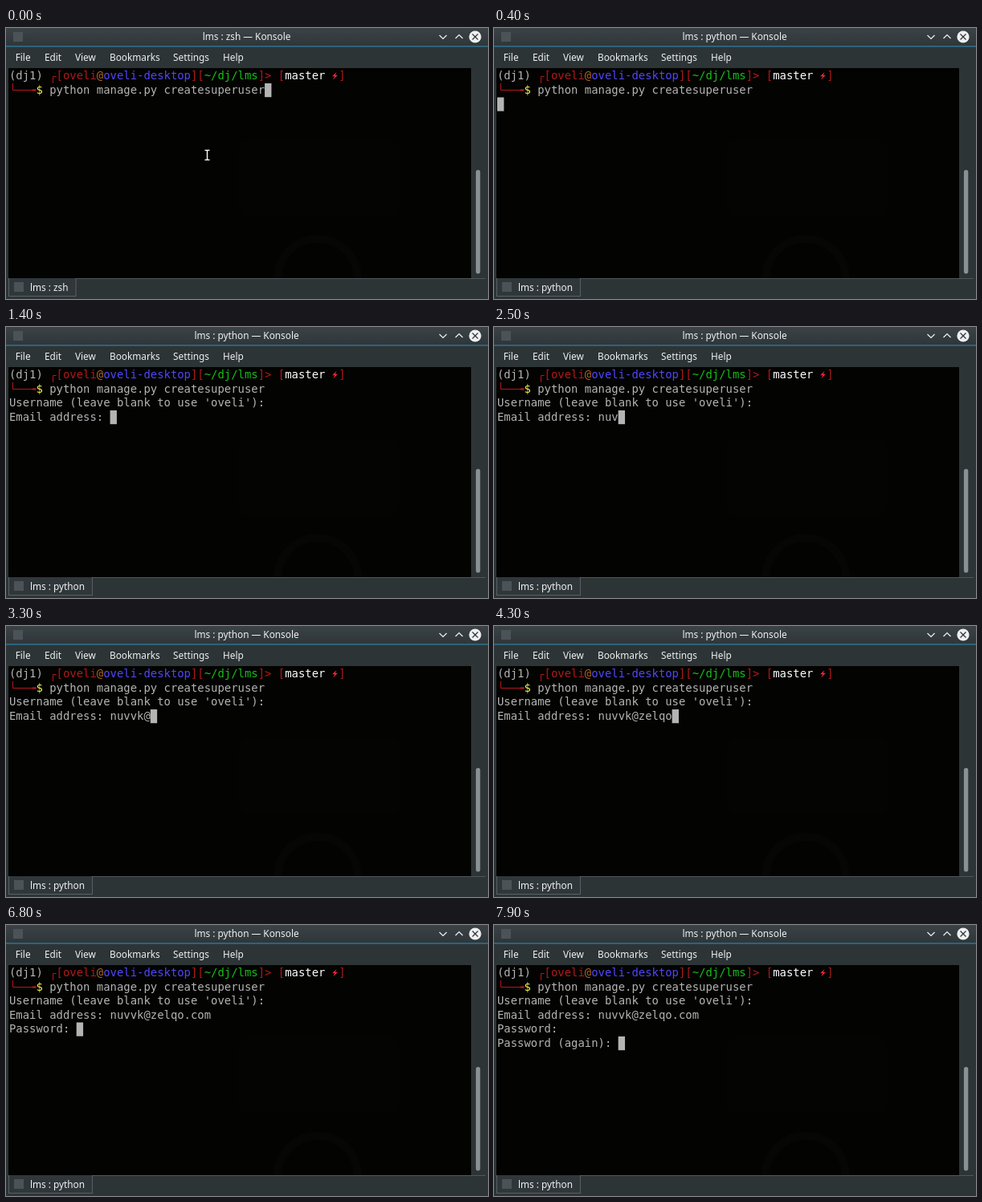
Recreate the animation shown at these times as an HTML page with a canvas. Size 600 px wide and 338 px high, loop 8000 ms.

```html
<!DOCTYPE html>
<html lang="en">
<head>
<meta charset="utf-8">
<title>Terminal</title>
<style>
html, body { margin: 0; width: 100%; height: 100%; overflow: hidden; background: #2d3436; }
canvas { display: block; width: 600px; height: 338px; }
</style>
</head>
<body>
<canvas id="stage"></canvas>
<script>
const W = 600, H = 338, LOOP = 8000;
const CELL_W = 8.37, CELL_H = 17.5, LEFT = 4, TOP = 51.5;
const MONO = '13.9px "DejaVu Sans Mono", monospace';
const UI = '11.8px "Noto Sans", sans-serif';
const RED = '#b01818', GREY = '#b4b4b4', LIGHT = '#eff0f1', CHROME = '#2d3436';

const canvas = document.getElementById('stage');
const ctx = canvas.getContext('2d');
const dpr = window.devicePixelRatio || 1;
canvas.width = W * dpr;
canvas.height = H * dpr;

const USER = 'oveli';
const EMAIL = 'nuvvk@zelqo.com';
const KEYS = [2000, 2500, 2500, 2700, 3000, 3300, 3500, 3900, 4000, 4100, 4300, 4400, 4600, 4700, 5100];
const ENTER = 100, TITLE = 300, ASK_USER = 800, ASK_EMAIL = 1400, ASK_PASS = 5100, ASK_AGAIN = 7700;

const colX = c => LEFT + c * CELL_W;
const rowY = r => TOP + r * CELL_H;

function box(x, y, w, h, color) {
  ctx.fillStyle = color;
  ctx.fillRect(x, y, w, h);
}

function roundBox(x, y, w, h, r, color) {
  ctx.fillStyle = color;
  ctx.beginPath();
  ctx.roundRect(x, y, w, h, r);
  ctx.fill();
}

function line(points, color, width = 1) {
  ctx.strokeStyle = color;
  ctx.lineWidth = width;
  ctx.beginPath();
  points.forEach(([x, y]) => ctx.lineTo(x, y));
  ctx.stroke();
}

function label(text, x, y, align = 'left') {
  ctx.font = UI;
  ctx.textAlign = align;
  ctx.fillStyle = LIGHT;
  ctx.fillText(text, x, y);
}

// Terminal text keeps to the cell grid.
function put(text, col, row, color = GREY) {
  ctx.font = MONO;
  ctx.textAlign = 'left';
  ctx.fillStyle = color;
  [...text].forEach((ch, i) => ctx.fillText(ch, colX(col + i), rowY(row) + 12.7));
  return col + text.length;
}

function drawFrame(title) {
  box(0, 0, W, H, CHROME);
  const bar = ctx.createLinearGradient(0, 0, 0, 22);
  bar.addColorStop(0, '#3b4347');
  bar.addColorStop(1, '#2f3639');
  box(0, 0, W, 22.3, bar);
  box(0, 22.3, W, 1.2, '#3082a8');
  box(9, 5, 12, 12, '#4b5358');
  label(`${title} — Konsole`, 299.5, 15, 'center');

  line([[539.5, 9], [544, 13.5], [548.5, 9]], LIGHT, 1.2);
  line([[559.5, 13], [564, 8.5], [568.5, 13]], LIGHT, 1.2);
  ctx.fillStyle = LIGHT;
  ctx.beginPath();
  ctx.arc(584, 11, 7.6, 0, Math.PI * 2);
  ctx.fill();
  line([[580.5, 7.5], [587.5, 14.5]], '#31363b', 1.2);
  line([[587.5, 7.5], [580.5, 14.5]], '#31363b', 1.2);

  const menu = { File: 11.7, Edit: 48, View: 86, Bookmarks: 129, Settings: 208, Help: 270 };
  for (const name in menu) label(name, menu[name], 41);
}

function drawTabs(title) {
  box(0, 312, W, 26, CHROME);
  box(3, 312, 594, 1, '#50575a');
  ctx.font = UI;
  const w = ctx.measureText(title).width + 37;
  box(3, 312, w, 23, '#5a6164');
  box(4, 312, w - 2, 22, '#30373a');
  box(10, 317, 12, 12, '#4b5358');
  label(title, 30, 328);
}

function drawScreen() {
  ctx.save();
  ctx.beginPath();
  ctx.rect(3, 50, 576, 262);
  ctx.clip();
  box(3, 50, 576, 262, '#030302');
  roundBox(290, 140, 200, 95, 10, '#040403');
  ctx.strokeStyle = '#060605';
  ctx.lineWidth = 10;
  ctx.beginPath();
  ctx.arc(388, 313, 50, Math.PI, 0);
  ctx.stroke();
  ctx.restore();
  roundBox(584.9, 177, 5.4, 129.5, 2.7, '#8a9094');
}

function drawPrompt() {
  const parts = [
    ['(dj1) ', GREY], [' [', RED], [USER, RED], ['@', '#b26818'],
    [USER + '-desktop', '#5046fa'], ['][', RED], ['~/dj/lms', '#18c018'],
    [']> [', RED], ['master', '#ffffff'], ['  ]', RED]
  ];
  let col = 0;
  for (const [text, color] of parts) col = put(text, col, 0, color);

  line([[58.5, 69], [58.5, 60.5], [62.6, 60.5]], RED);
  line([[8.5, 69], [8.5, 77.5], [37, 77.5]], RED);
  line([[33, 77.5], [37.5, 77.5]], RED, 2.4);

  ctx.fillStyle = '#f0283c';
  ctx.beginPath();
  [[411.5, 55], [406, 60.2], [409.3, 60.2], [407, 64.6], [413, 58.8], [409.8, 58.8]]
    .forEach(([x, y]) => ctx.lineTo(x, y));
  ctx.fill();

  put('$', 4, 1, '#f4f44c');
  return put('python manage.py createsuperuser', 6, 1);
}

function drawMouse() {
  const beam = [[[247.5, 152.5], [253.5, 152.5]], [[250.5, 152.5], [250.5, 164.5]], [[247.5, 164.5], [253.5, 164.5]]];
  beam.forEach(p => line(p, '#ffffff', 1.4));
}

function draw(t) {
  const title = t < TITLE ? 'lms : zsh' : 'lms : python';
  ctx.setTransform(dpr, 0, 0, dpr, 0, 0);
  drawFrame(title);
  drawScreen();
  drawTabs(title);

  let row = 1, col = drawPrompt();
  const next = text => { row++; col = put(text, 0, row); };
  if (t >= ENTER) next('');
  if (t >= ASK_USER) col = put(`Username (leave blank to use '${USER}'): `, 0, row);
  if (t >= ASK_EMAIL) {
    next('Email address: ');
    col = put(EMAIL.slice(0, KEYS.filter(k => k <= t).length), col, row);
  }
  if (t >= ASK_PASS) next('Password: ');
  if (t >= ASK_AGAIN) next('Password (again): ');
  box(colX(col), rowY(row), CELL_W, 17.2, GREY);
  if (t < ENTER) drawMouse();
}

function tick() {
  draw(performance.now() % LOOP);
  requestAnimationFrame(tick);
}
tick();
</script>
</body>
</html>
```
